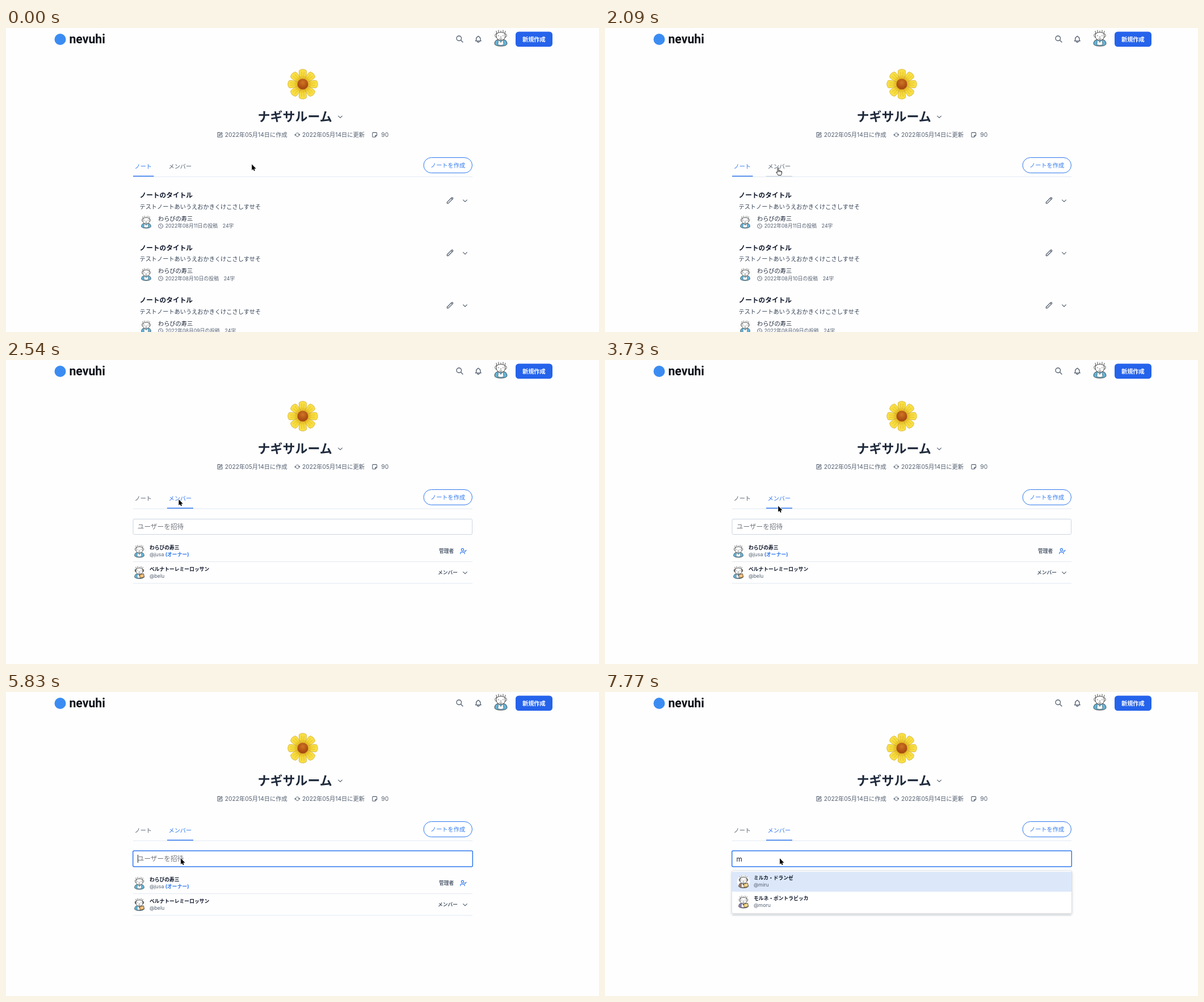
These frames come from a looping animation (1045x536 px, 8000 ms). An HTML page:

```html
<!DOCTYPE html>
<html lang="ja">
<head>
<meta charset="utf-8">
<style>
  html, body { margin: 0; width: 100%; height: 100%; overflow: hidden; background: #fefefe; }
  svg { display: block; width: 1045px; height: 536px; font-family: Inter, "Noto Sans CJK JP", "Noto Sans CJK", sans-serif; }
</style>
</head>
<body>
<svg id="stage" viewBox="0 0 1045 536"></svg>
<script>
const INK = '#1e293b', GRAY = '#535f70', BLUE = '#3079ee', LINE = '#e2e8f0';
const LOOP = 8000;

const ICONS = {
  search: 'M21 21l-6-6m2-5a7 7 0 11-14 0 7 7 0 0114 0z',
  bell: 'M15 17h5l-1.4-1.4A2 2 0 0118 14.2V11a6 6 0 00-4-5.7V5a2 2 0 10-4 0v.3A6 6 0 006 11v3.2a2 2 0 01-.6 1.4L4 17h5m6 0v1a3 3 0 11-6 0v-1m6 0H9',
  edit: 'M12 4H4v16h16v-8M17.600 3.600l2.800 2.800L11.800 15H9v-2.800z',
  sync: 'M5 8a8 8 0 0115 4M19 16a8 8 0 01-15-4M17 11h6l-3 3zM1 13h6l-3-3z',
  sheet: 'M6 4h12a2 2 0 012 2v8l-6 6H6a2 2 0 01-2-2V6a2 2 0 012-2zM14 20v-6h6',
  pencil: 'M15.2 5.2l3.6 3.6m-2.1-5.1a2.5 2.5 0 113.6 3.6L6.5 21H3v-3.5z',
  chevron: 'M19 9l-7 7-7-7',
  clock: 'M12 8v4l3 3m6-3a9 9 0 11-18 0 9 9 0 0118 0z',
  userCheck: 'M16 21v-2a4 4 0 00-4-4H6a4 4 0 00-4 4v2M5 7a4 4 0 108 0 4 4 0 10-8 0M16 11l2 2 4-4'
};

// cy is the optical middle of the line of text
const text = (x, cy, size, str, fill = INK, weight = 400) =>
  `<text x="${x}" y="${cy + size * .38}" font-size="${size}" fill="${fill}" font-weight="${weight}">${str}</text>`;

const icon = (name, x, y, scale = .487, color = GRAY) =>
  `<path d="${ICONS[name]}" transform="translate(${x} ${y}) scale(${scale}) translate(-12 -12)"
    fill="none" stroke="${color}" stroke-width="2.200" stroke-linecap="round" stroke-linejoin="round"/>`;

const rect = (x, y, w, h, fill, more = '') =>
  `<rect x="${x}" y="${y}" width="${w}" height="${h}" fill="${fill}" ${more}/>`;

const group = (id, ...parts) => `<g id="${id}">${parts.join('')}</g>`;

function avatar(x, y, r, body = '#62b5da', ears = '#fff', card = '') {
  return `<g transform="translate(${x} ${y}) scale(${r / 15})" stroke="#3c3c3c" stroke-width=".9" stroke-linejoin="round" stroke-linecap="round">
    <circle r="14.6" fill="#fff" stroke="#eceef0" stroke-width=".6"/>
    <path d="M-4 3Q-11 3-11 11Q-8 14.500 0 14.500Q8 14.500 11 11Q11 3 4 3z" fill="${body}"/>
    <path d="M-4 3L0 8L4 3L5 12Q0 14-5 12z" fill="#fff" stroke-width=".6"/>
    <path d="M-7-7Q-11-8-10-3Q-9 0-7-1zM7-7Q11-8 10-3Q9 0 7-1z" fill="${ears}"/>
    <path d="M-7-8Q0-12 7-8Q9-2 6 2Q0 6.500-6 2Q-9-2-7-8z" fill="#fff"/>
    <path d="M-7-8l-1-4M-4-10l0-3.500M0-10.500v-2M4-10l0-3.500M7-8l1-4M-4-4.500v1M4-4.500v1M-1-1.500h2M-2 1.500Q0 3 2 1.500" fill="none"/>
    ${card && `<path d="M1 5l9-2 1 8-9 2z" fill="${card}"/><path d="M3.500 7l5-1M4 9.500l5-1" stroke="#fff"/>`}
  </g>`;
}

const flower = () => {
  let petals = '';
  for (const i of [1, 3, 5, 7, 0, 2, 4, 6])
    petals += `<g transform="rotate(${i * 45})">
      <path d="M-2.500-7Q-7-15-6.800-22Q-6.500-25.500-3.500-25.500Q-1.500-27 0-26Q1.500-27 3.500-25.500Q6.500-25.500 6.800-22Q7-15 2.500-7z" fill="url(#petal)" stroke="#b98f1a" stroke-width=".5"/>
      <path d="M-1.500-12L-2.300-22M1.500-12L2.300-22" stroke="#dcb427" stroke-width=".7"/></g>`;
  return `<g transform="translate(523 99)">${petals}<circle r="9.500" fill="url(#core)"/></g>`;
};

const note = (day, i) => `<g transform="translate(0 ${i * 92.4})">` +
  text(235.5, 294.8, 11.7, 'ノートのタイトル', '#0f172a', 700) +
  text(235.5, 315, 10.2, 'テストノートあいうえおかきくけこさしすせそ', '#334155') +
  avatar(247, 342, 11.5) +
  text(268, 336, 10.2, 'わらびの寿三') +
  icon('clock', 272.6, 349.2, .43) +
  text(280.7, 349, 8.77, `2022年08月${day}日の投稿　24字`, GRAY) +
  icon('pencil', 782.5, 304, .57) + icon('chevron', 809, 304.5) + '</g>';

const person = (x, cy, name, handle) =>
  text(x, cy, 8.77, name, '#0f172a', 700) + text(x, cy + 12, 8.77, handle, GRAY);

const tabs = (id, active) => group(id,
  text(226.5, 244, 10.2, 'ノート', active ? GRAY : BLUE),
  text(286.5, 244, 10.2, 'メンバー', active ? BLUE : GRAY),
  active ? rect(284, 260.5, 46, 1.5, BLUE) : rect(224, 260.5, 36.5, 1.5, BLUE));

const stage = document.getElementById('stage');
stage.innerHTML = `<defs>
  <radialGradient id="petal" gradientUnits="userSpaceOnUse" cx="0" cy="0" r="27">
    <stop offset=".35" stop-color="#e3b520"/><stop offset=".6" stop-color="#f7dc3c"/><stop offset="1" stop-color="#f9e04a"/></radialGradient>
  <radialGradient id="core" cy=".35"><stop offset="0" stop-color="#d07524"/><stop offset="1" stop-color="#a94d12"/></radialGradient>
  <filter id="shadow" x="-5%" y="-20%" width="110%" height="150%"><feDropShadow dx="0" dy="2" stdDeviation="2" flood-opacity=".18"/></filter>
  </defs>` +
  // header
  `<circle cx="95.5" cy="20" r="10" fill="#3b8cf2"/>
  <text x="111.5" y="27" font-size="21.2" font-weight="700" fill="#0b0f17" font-family="Roboto, sans-serif">nevuhi</text>` +
  icon('search', 799.5, 19.5, .608) + icon('bell', 832.3, 19.8, .608) + avatar(872, 17.5, 15) +
  rect(898, 6.5, 65, 26.5, '#2563eb', 'rx="5.5"') +
  text(910, 19.8, 10.2, '新規作成', '#fff', 700) +
  // hero
  flower() +
  text(443.5, 156, 22, 'ナギサルーム', INK, 700) + icon('chevron', 589, 156.5) +
  icon('edit', 377, 188.3) + text(385.8, 188.3, 10.25, '2022年05月14日に作成', GRAY) +
  icon('sync', 513.5, 188.3, .42) + text(522, 188.3, 10.25, '2022年05月14日に更新', GRAY) +
  icon('sheet', 649.7, 188.3) + text(661.3, 188.3, 10.25, '90', GRAY) +
  // tab bar
  rect(224, 261.8, 598, 1, LINE) +
  rect(736, 228.5, 85.5, 27, '#fff', `rx="13.5" stroke="${BLUE}"`) +
  text(748, 242, 10.2, 'ノートを作成', BLUE) +
  tabs('tabNotes', false) + tabs('tabMembers', true) +
  group('hover', rect(284, 260.8, 46, 1.3, '#cbd5e1')) +
  group('notes', ...['11', '10', '09'].map(note)) +
  group('members',
    rect(224, 280.5, 597.5, 27, '#fff', 'rx="2" stroke="#cbd5e1"'),
    group('focus', rect(223.7, 280, 598.6, 28, '#fff', `rx="2" stroke="${BLUE}" stroke-width="1.5"`)),
    group('hint', text(231.7, 294, 11.7, 'ユーザーを招待', '#6f747c')),
    avatar(235, 337, 11.5),
    person(253, 331, 'わらびの寿三', `@jusa <tspan fill="${BLUE}" font-weight="700">(オーナー)</tspan>`),
    text(763, 337, 8.77, '管理者', GRAY, 700), icon('userCheck', 806, 337, .52, BLUE),
    rect(224, 355, 598, 1, LINE),
    avatar(235, 374.5, 11.5, '#62b5da', '#7d7774', '#eda54b'),
    person(253, 368.3, 'ベルナトーレミーロッサン', '@belu'),
    text(761, 374.5, 8.77, 'メンバー', GRAY, 700), icon('chevron', 809, 375),
    rect(224, 393.3, 598, 1, LINE)) +
  group('results',
    text(231.5, 294.3, 11.7, 'm', '#111827'),
    rect(223.5, 315, 599, 75.3, '#fff', 'rx="2" stroke="#d5d9df" stroke-width=".8" filter="url(#shadow)"'),
    rect(224, 317, 598, 35, '#dce8fa'),
    avatar(244, 334.5, 11.5, '#9c8169', '#a39383', '#f0c45e'), person(262, 328, 'ミルカ・ドランゼ', '@miru'),
    avatar(244, 370, 11.5, '#8c86b5', '#fff', '#f0c45e'), person(262, 363.4, 'モルネ・ポントラビッカ', '@moru')) +
  rect(0, 287, 1, 14, '#111827', 'id="caret"') +
  group('arrow', `<path transform="scale(.87)" d="M.8 .8V13L3.500 10.500 5.200 14.300 7.200 13.500 5.600 9.700H9.300Z" stroke="#fff" stroke-width="1.600" paint-order="stroke"/>`) +
  group('hand', `<path d="M3 8.500V1.600Q3 .4 4 .4T5 1.600V5.500Q6.600 4.600 7.100 6Q8.600 5.200 9.100 6.700Q10.600 6.300 10.600 8V10Q10.200 12 9.200 13.600H4.200Q3 11 .8 8.900Q.5 7 3 8.500M5 5.500V8M7.100 6V8M9.100 6.700V8.300" fill="#fff" stroke="#111" stroke-width=".9" stroke-linejoin="round"/>`);

const $ = id => document.getElementById(id);
const show = (id, on) => { $(id).style.display = on ? '' : 'none'; };

// pointer stops: start time, x, y
const STOPS = [
  [0, 432.5, 239.5], [1500, 381.5, 239.8], [1650, 321, 248], [1940, 302, 247], [2090, 301, 246],
  [2390, 303.7, 245], [3730, 304.5, 256.5], [3880, 303, 292.8], [4030, 302, 292.3],
  [4180, 303, 292.3], [4330, 307.3, 292.5]
];
const CARET = [[4930, 5380], [5830, 6730], [7330, 7770]];

function render(t) {
  const onMembers = t >= 2390, listed = t >= 2540, typed = t >= 6280;
  const overTab = t >= 1650 && t < 2390;
  show('tabNotes', !onMembers);
  show('tabMembers', onMembers);
  show('notes', !onMembers);
  show('hover', overTab);
  show('members', listed);
  show('focus', t >= 4930);
  show('hint', !typed);
  show('results', typed);
  show('caret', CARET.some(([on, off]) => t >= on && t < off));
  $('caret').setAttribute('x', typed ? 241.3 : 232);
  show('hand', overTab);
  show('arrow', !overTab);
  const [, x, y] = STOPS.findLast(stop => t >= stop[0]);
  $(overTab ? 'hand' : 'arrow').setAttribute('transform', `translate(${x} ${y})`);
}

const start = performance.now();
function tick() {
  render((performance.now() - start) % LOOP);
  requestAnimationFrame(tick);
}
tick();
</script>
</body>
</html>
```
